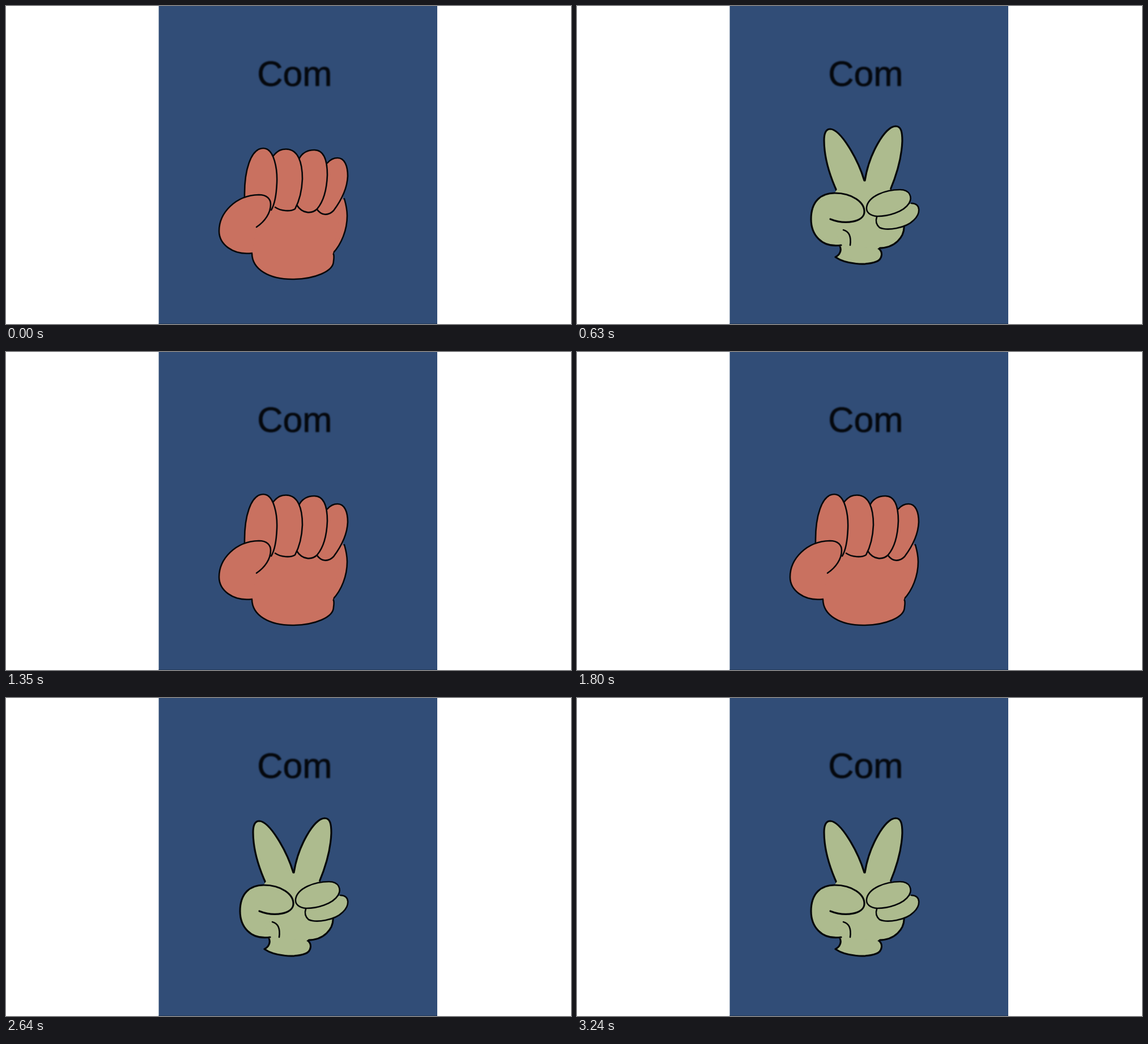
Recreate the animation shown at these times as an HTML page. Size 997 by 561 pixels, loop 3.33 s.

```html
<!DOCTYPE html>
<html lang="en">
<head>
<meta charset="utf-8">
<title>Rock paper scissors</title>
<style>
  html, body { margin: 0; width: 100%; height: 100%; overflow: hidden; background: #fff; }
  svg { display: block; width: 100vw; height: 100vh; }
  .hand { stroke: #06080a; stroke-width: 2.6; stroke-linejoin: round; stroke-linecap: round; }
  .bold { stroke-width: 3.2; }
  .flat { stroke: none; }
  .line { fill: none; }
  text { font: 62.6px "Liberation Sans", Arial, sans-serif; fill: #05080d; stroke: #05080d; stroke-width: .7px; filter: blur(.9px); }
</style>
</head>
<body>
<svg viewBox="0 0 997 561">
  <rect width="997" height="561" fill="#fff"/>
  <rect x="269.5" width="491.5" height="561" fill="#314d77"/>
  <rect x="269.5" y="560" width="491.5" height="1" fill="#233a5c"/>
  <text x="443.3" y="140.5">Com</text>

  <g class="hand" fill="#c97160">
    <path d="M434 436C434 465 465 482 505 482C545 482 578 468 578 450C579 443 579 438 577 436C592 420 602 395 602 370C602 357 599 347 597 340"/>
    <path class="flat" d="M434 437L440 330H596L577 437Z"/>
    <path d="M567 277C573 270 579 268 585 268C598 268 603 283 603 300C602 325 590 345 578 361C568 371 556 369 549 359"/>
    <path d="M517 270C523 258 533 254 544 254C562 254 567 275 567 298C566 325 560 345 549 358C540 367 523 367 513 351"/>
    <path d="M472 264C480 254 487 252.5 494 252.5C515 252.5 523 275 523 305C522 330 517 345 510 358C502 363 485 362 475 355"/>
    <path d="M421 338C420 290 432 251 454 251C474 251 479 290 478 312C477 335 474 350 468 360"/>
    <path d="M434 436C400 440 376 420 376 397C376 365 405 334 446 333C460 333 467 340 467 350C467 365 457 380 442 390"/>
  </g>

  <g class="hand" fill="#e0c583">
    <path d="M455 455C440 430 425 415 410 395C390 370 369 345 371 325C375 308 395 312 407 328C418 343 430 352 438 352C432 310 415 250 418 215C421 195 442 196 450 215C462 245 470 285 476 308C480 270 482 215 492 180C498 160 520 160 524 180C528 220 524 270 522 305C532 275 545 225 560 200C570 183 590 190 588 210C585 250 570 295 562 325C580 305 600 280 617 268C632 258 648 268 642 284C630 315 600 350 585 380C575 410 560 430 555 455C545 476 470 476 455 455Z"/>
  </g>

  <g class="hand" fill="#adbb8e">
    <path class="bold" d="M459 328C444 295 436 262 436 237C436 224 440 217 447 217C465 218 495 268 507 308H508C515 262 543 213 562 212C572 212 574 222 574 238C573 270 563 300 553 324"/>
    <path class="bold" d="M577 386C579 408 560 428 531 427C541 433 539 447 528 451C510 458 475 456 456 443C464 439 468 430 463 422"/>
    <path class="flat" d="M460 322H552L576 388L531 428L464 424L440 400V350Z"/>
    <path d="M529 372C527 378 527 385 534 391C548 397 580 392 594 378C606 367 608 349 590 348"/>
    <path d="M511 355C514 335 545 324 570 324C588 324 592 338 586 348C576 364 548 371 530 371C517 370 510 364 511 355Z"/>
    <path class="bold" d="M466 422C430 427 413 402 413 376C413 345 430 330 455 330C485 330 508 346 507 364C506 380 475 387 447 376"/>
    <path class="line" d="M470 395C481 398 484 408 482 422"/>
  </g>
</svg>
<script>
const LOOP = 3330, TICK = 30;
const hands = document.querySelectorAll('.hand');

// Each run cycles rock, paper, scissors once per tick, then holds its last pose.
const runs = [
  { from: 0, to: 4, pose: 0 },
  { from: 7, to: 9, pose: 0 },
  { from: 12, to: 13, pose: 1 },
  { from: 17, to: 32, pose: 1 },
  { from: 34, to: 44, pose: 2 },
  { from: 46, to: 70, pose: 1 },
  { from: 73, to: 79, pose: 0 },
  { from: 81, to: 88, pose: 1 },
  { from: 91, to: 108, pose: 0 }
];

function poseAt(ms) {
  const tick = Math.floor(ms / TICK);
  const run = runs.filter(r => r.from <= tick).pop();
  return (run.pose + Math.min(tick, run.to) - run.from) % 3;
}

function render(ms) {
  const pose = poseAt(ms);
  hands.forEach((hand, i) => { hand.style.display = i === pose ? '' : 'none'; });
}

const start = performance.now();
function frame() {
  render((performance.now() - start) % LOOP);
  requestAnimationFrame(frame);
}
frame();
</script>
</body>
</html>
```
